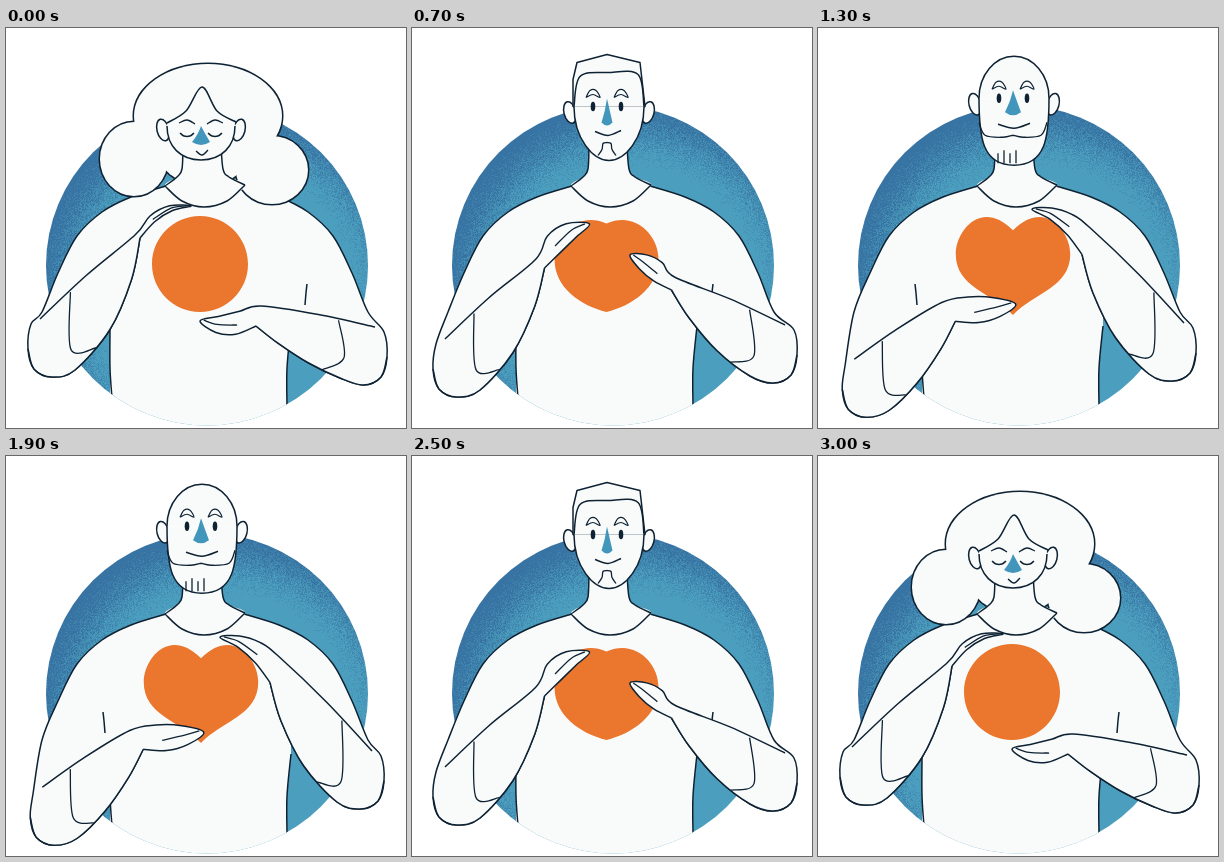
Write an HTML page with a canvas that moves like this. It is 400 px wide and 400 px high and loops after 3.2 s.

```html
<!DOCTYPE html>
<html lang="en">
<head>
<meta charset="utf-8">
<title>Hands around a heart</title>
<style>
  html, body { margin: 0; width: 100%; height: 100%; overflow: hidden; background: #fff; }
  canvas { display: block; width: 100vw; height: 100vh; }
</style>
</head>
<body>
<canvas id="stage" width="400" height="400"></canvas>
<script>
const ctx = document.getElementById('stage').getContext('2d');
const INK = '#0e2233', SKIN = '#f9fbfb', ORANGE = '#eb762d', BLUE = '#4396bb';
const LAST = 12, MIRROR = 398, MID = 195;

// Arms: elbow, upper wrist, lower wrist, fingertip, palm thickness, bend.
// Right arms are written as if on the left, then mirrored.
const poses = [
  { at: 0, heart: { cx: 194, w: 48, top: 188, mid: 236, end: 284, notch: 0, point: 0 },
    left: [[28, 341], [129, 207], [134, 210], [185, 178], 2, 8],
    right: [[23, 349], [143, 278], [148, 298], [204, 293], 5, -5] },
  { at: 3, heart: { cx: 193, w: 49, top: 192, mid: 235, end: 282, notch: 2, point: 0 },
    left: [[30, 347], [127, 208], [132, 215], [181, 179], 2, 7],
    right: [[20, 342], [143, 270], [146, 287], [201, 269], 8, -1] },
  { at: 7, heart: { cx: 196, w: 55, top: 189, mid: 227, end: 286, notch: 8, point: 0.6 },
    left: [[24, 375], [120, 255], [133, 265], [174, 213], 11, 6],
    right: [[18, 352], [128, 228], [131, 237], [159, 185], 4, 4] },
  { at: 8, heart: { cx: 195, w: 55, top: 190, mid: 226, end: 287, notch: 10, point: 0.8 },
    left: [[28, 379], [120, 252], [135, 270], [185, 232], 12, 3],
    right: [[20, 345], [126, 208], [128, 240], [172, 182], 2, 6] },
  { at: LAST, heart: { cx: 195, w: 58, top: 190, mid: 226, end: 287, notch: 13, point: 0.95 },
    left: [[31, 382], [125, 282], [138, 301], [202, 291], 5, -2],
    right: [[28, 345], [126, 197], [136, 222], [188, 181], 1, 6] }
];

// Face: centre, half width, top, cheek and chin height, jaw squareness.
// Puffs of hair are ellipses: x, y, rx, ry.
const heads = [
  { cx: 195, w: 34, top: 60, cheek: 98, chin: 132, jaw: 0.6, eye: 106, shut: true,
    nose: [9, 19], smile: [123, 6], hairline: [[161, 95], [180, 83], [196, 59], [211, 83], [230, 94]],
    puffs: [[202, 88, 74, 52], [128, 131, 34, 37], [266, 142, 36, 34], [198, 118, 48, 40]] },
  { cx: 197, w: 37, top: 52, cheek: 74, chin: 126, jaw: 0.5, eye: 82, shut: true,
    nose: [8, 29], smile: [108, 9], hairline: [[160, 74], [164, 58], [196, 51], [224, 58], [234, 74]],
    puffs: [[202, 45, 40, 37], [166, 58, 27, 32], [230, 57, 24, 38], [169, 109, 15, 25], [230, 108, 15, 26]] },
  { cx: 197, w: 35, top: 40, cheek: 75, chin: 129, jaw: 0.45, eye: 75, nose: [5.5, 27], smile: [100, 13],
    hairline: [[162, 75], [168, 45], [196, 41], [226, 43], [232, 75]], beard: 'goatee',
    crop: [[161, 75], [161, 48], [165, 31], [195, 23], [228, 31], [233, 75]] },
  { cx: 197, w: 34, top: 32, cheek: 72, chin: 124, jaw: 0.45, eye: 71, nose: [6, 28], smile: [100, 14],
    beard: 'tuft', crop: [[172, 44], [176, 27], [188, 26], [187, 20], [213, 23], [222, 44]] },
  { cx: 196, w: 35, top: 28, cheek: 70, chin: 137, jaw: 0.9, eye: 70, nose: [8, 25], smile: [96, 16], beard: 'full' }
];

const shoulder = [[160, 158], [125, 169], [96, 184], [71, 208], [52, 245], [36, 284]];
const collar = [[159, 158], [176, 173], [198, 179], [221, 173], [239, 157]];

const mix = (a, b, k) => {
  if (typeof a === 'number') return a + (b - a) * k;
  if (Array.isArray(a)) return a.map((v, i) => mix(v, b[i], k));
  return Object.fromEntries(Object.keys(a).map(f => [f, mix(a[f], b[f], k)]));
};
const shift = ([x, y], dx, dy) => [x + dx, y + dy];
const flip = pts => pts.map(([x, y]) => [2 * MID - x, y]);

// Point at k on a line, pushed d to its left
function beside(a, b, k, d) {
  const dx = b[0] - a[0], dy = b[1] - a[1], len = Math.hypot(dx, dy);
  return shift(mix(a, b, k), d * dy / len, -d * dx / len);
}

// Smooth curve through points
function curve(p) {
  const path = new Path2D(), at = i => p[Math.max(0, Math.min(p.length - 1, i))];
  path.moveTo(...p[0]);
  for (let i = 0; i < p.length - 1; i++) {
    const a = at(i - 1), b = at(i), c = at(i + 1), d = at(i + 2);
    path.bezierCurveTo(b[0] + (c[0] - a[0]) / 6, b[1] + (c[1] - a[1]) / 6,
      c[0] - (d[0] - b[0]) / 6, c[1] - (d[1] - b[1]) / 6, ...c);
  }
  return path;
}

function polygon(p) {
  const path = new Path2D();
  p.forEach(q => path.lineTo(...q));
  path.closePath();
  return path;
}

function ellipse(x, y, rx, ry, turn = 0) {
  const path = new Path2D();
  path.ellipse(x, y, rx, ry, turn, 0, Math.PI * 2);
  return path;
}

function fill(path, color = SKIN) { ctx.fillStyle = color; ctx.fill(path); }
function ink(path, w = 1.5) { ctx.strokeStyle = INK; ctx.lineWidth = w; ctx.stroke(path); }
function line(p, w) { ink(curve(p), w); }
function blob(path) { fill(path); ink(path); }

// Outlines first, then fills, so only the outer contour stays
function union(paths) {
  paths.forEach(p => ink(p, 3));
  paths.forEach(p => fill(p));
}

function within(before, drawing) {
  ctx.save();
  before();
  drawing();
  ctx.restore();
}
const mirrored = drawing => within(() => ctx.transform(-1, 0, 0, 1, MIRROR, 0), drawing);

const disc = ellipse(201, 237.5, 161, 160);

// Airbrushed blue, drawn once
function makeBackdrop() {
  const cv = document.createElement('canvas');
  cv.width = cv.height = 400;
  const g = cv.getContext('2d'), img = g.createImageData(400, 400);
  const dark = [56, 116, 163], light = [76, 158, 190];
  let seed = 7;
  for (let i = 0; i < 160000; i++) {
    seed = (seed * 1664525 + 1013904223) >>> 0;
    const grain = (seed / 4294967296 - 0.5) * 0.8;
    const depth = (Math.hypot(i % 400 - 218, i / 400 - 267) - 138) / 42;
    const k = Math.max(0, Math.min(1, Math.round((depth + grain) * 3) / 3));
    img.data.set([...mix(light, dark, k), 255], i * 4);
  }
  g.putImageData(img, 0, 0);
  return cv;
}
const backdrop = makeBackdrop();

function makeArm([elbow, top, low, tip, thick, bend]) {
  const back = shift(elbow, 41, 1), crease = shift(elbow, 6, -50);
  const len = Math.hypot(low[0] - back[0], low[1] - back[1]);
  const bulge = -Math.max(0, len - 80) * 0.2;
  const under = [shift(elbow, -3, -45), shift(elbow, -6, -20), elbow, shift(elbow, 18, 8), back,
    beside(back, low, 0.35, bulge), beside(back, low, 0.72, bulge * 0.8), low];
  const up = thick + bend, down = bend - thick;
  const palm = [0.35, 0.7].map(k => beside(top, tip, k, up));
  const inner = [0.7, 0.35].map(k => beside(low, tip, k, down));
  const hand = [crease, beside(crease, top, 0.5, 2), top, ...palm, tip, ...inner, low];
  return {
    outer: [...shoulder, ...under], under, hand,
    finger: [mix(tip, palm[1], 0.2), mix(palm[1], inner[0], 0.5), mix(palm[0], inner[1], 0.6)],
    cuff: [mix(crease, top, 0.32), shift(mix(crease, back, 0.6), 10, 0), beside(back, low, 0.2, bulge * 0.7)],
    lowered: tip[1] > 200
  };
}

function drawShoulder(arm) {
  fill(curve(arm.outer));
  line(arm.outer);
  if (arm.lowered) line([[97, 256], [98, 265], [99, 277]]);
}

function drawForearm(arm) {
  fill(curve([...arm.hand, ...arm.under.slice(2).reverse()]));
  line(arm.under.slice(1));
  line(arm.hand);
  line(arm.finger, 1.3);
  line(arm.cuff, 1.3);
}

function drawTorso() {
  within(() => ctx.clip(disc), () => {
    fill(polygon([[159, 158], [104, 200], [104, 400], [281, 400], [281, 340], [285, 298], [285, 200], [239, 157]]));
    line([[104, 300], [104, 340], [106, 370]]);
    line([[285, 298], [281, 340], [281, 378]]);
  });
}

function drawNeck() {
  const left = [[177, 116], [176, 141], [171, 149], collar[0]];
  const right = [[215, 116], [217, 141], [223, 149], collar[4]];
  fill(curve([...left, ...collar.slice(1, 4), ...right.slice().reverse()]));
  [left, right, collar].forEach(p => line(p));
}

function drawBeard(h) {
  const both = pts => [pts, flip(pts)].forEach(p => line(p, 1.3));
  const ticks = (x, y, n) => {
    for (let i = 0; i < n; i++) line([[x + i * 6, y - i % 2 * 3], [x + i * 6, y + 10]], 1.3);
  };
  if (h.beard === 'goatee') both([[195, 111], [191, 112], [190, 118], [186, 124]]);
  if (h.beard === 'tuft') {
    blob(curve([[180, 121], [190, 119], [197, 111], [205, 118], [213, 120], [209, 130], [197, 135], [184, 131], [180, 121]]));
    ticks(191, 125, 2);
  }
  if (h.beard === 'full') {
    both([[161, 94], [167, 107], [185, 109], [195, 107]]);
    ticks(180, 125, 4);
  }
}

function drawEye(x, h, side) {
  const y = h.eye, brow = y - 12;
  if (h.shut) {
    line([[x - 7, y - 1], [x - 3, y + 2], [x + 3, y + 2], [x + 7, y - 1]], 1.5);
    line([[x - 8 * side, brow + 2], [x, brow - 2], [x + 8 * side, brow + 1]], 1.3);
  } else {
    fill(ellipse(x, y, 2.3, 4.8), INK);
    line([[x - 7, brow + 3], [x - 3, brow - 4], [x + 3, brow - 4], [x + 7, brow + 3], [x, brow], [x - 7, brow + 3]], 1.2);
  }
}

function drawFace(h) {
  const { cx, w, top, cheek, chin, jaw } = h, rise = (cheek - top) * 0.55;
  const jawline = new Path2D(), dome = new Path2D();
  jawline.moveTo(cx - w, cheek);
  jawline.bezierCurveTo(cx - w, mix(cheek, chin, 0.6), cx - w * jaw, chin, cx, chin);
  jawline.bezierCurveTo(cx + w * jaw, chin, cx + w, mix(cheek, chin, 0.6), cx + w, cheek);
  dome.moveTo(cx - w, cheek);
  dome.bezierCurveTo(cx - w, cheek - rise, cx - w * 0.55, top, cx, top);
  dome.bezierCurveTo(cx + w * 0.55, top, cx + w, cheek - rise, cx + w, cheek);

  for (const side of [-1, 1])
    blob(ellipse(cx + side * (w + 4), h.eye + (h.shut ? -4 : 6), 6, 11, side * 0.25));
  if (h.crop && h.hairline) blob(polygon(h.crop));
  fill(jawline);
  fill(dome);
  ink(jawline);
  if (h.hairline) line(h.hairline);
  else ink(dome);
  if (h.crop && !h.hairline) blob(polygon(h.crop));
  drawBeard(h);
  for (const side of [-1, 1]) drawEye(MID + side * 14, h, side);

  const [nw, nh] = h.nose, y = h.eye - 8, base = y + nh - 3;
  const nose = new Path2D();
  nose.moveTo(MID, y);
  nose.quadraticCurveTo(MID - nw * 0.3, y + nh * 0.45, MID - nw, base);
  nose.quadraticCurveTo(MID, base + 6, MID + nw, base);
  nose.quadraticCurveTo(MID + nw * 0.5, y + nh * 0.45, MID, y);
  fill(nose, BLUE);
  const [my, mw] = h.smile;
  line([[MID + 1 - mw, my], [MID + 1, my + 4], [MID + 1 + mw, my - 1]]);
}

function drawHeart({ cx, w, top, mid, end, notch, point }) {
  const path = new Path2D();
  for (const s of [-1, 1]) {
    path.moveTo(cx, top + notch);
    path.bezierCurveTo(cx + s * w * 0.55, top - notch * 1.6, cx + s * w, mix(mid, top, 0.55) - notch * 0.3, cx + s * w, mid);
    path.bezierCurveTo(cx + s * w, mix(mid, end, 0.55), cx + s * w * (0.55 - 0.2 * point), mix(end, mid, 0.4 * point), cx, end);
  }
  fill(path, ORANGE);
}

function draw(s) {
  const i = Math.max(0, poses.findIndex(p => p.at >= s) - 1);
  const a = poses[i], b = poses[i + 1], k = (s - a.at) / (b.at - a.at);
  const pose = mix(a, b, k), id = k < 0.5 ? i : i + 1, head = heads[id];
  const dy = mix(heads[i].eye, heads[i + 1].eye, k) - head.eye;
  const left = makeArm(pose.left), right = makeArm(pose.right);
  const atHead = drawing => within(() => ctx.translate(0, dy), drawing);

  fill(polygon([[0, 0], [400, 0], [400, 400], [0, 400]]), '#fff');
  within(() => ctx.clip(disc), () => ctx.drawImage(backdrop, 0, 0));
  drawTorso();
  drawShoulder(left);
  mirrored(() => drawShoulder(right));
  if (head.puffs) atHead(() => union(head.puffs.map(p => ellipse(...p))));
  drawNeck();
  atHead(() => drawFace(head));
  drawHeart(pose.heart);
  drawForearm(left);
  mirrored(() => drawForearm(right));
}

ctx.lineJoin = 'round';
let shown = -1;
function tick() {
  // Out and back, with a rest at both ends
  const n = Math.floor(performance.now() % 3200 / 100);
  const s = Math.max(0, Math.min(LAST, n - 2, 30 - n));
  if (s !== shown) draw(shown = s);
  requestAnimationFrame(tick);
}
tick();
</script>
</body>
</html>
```
